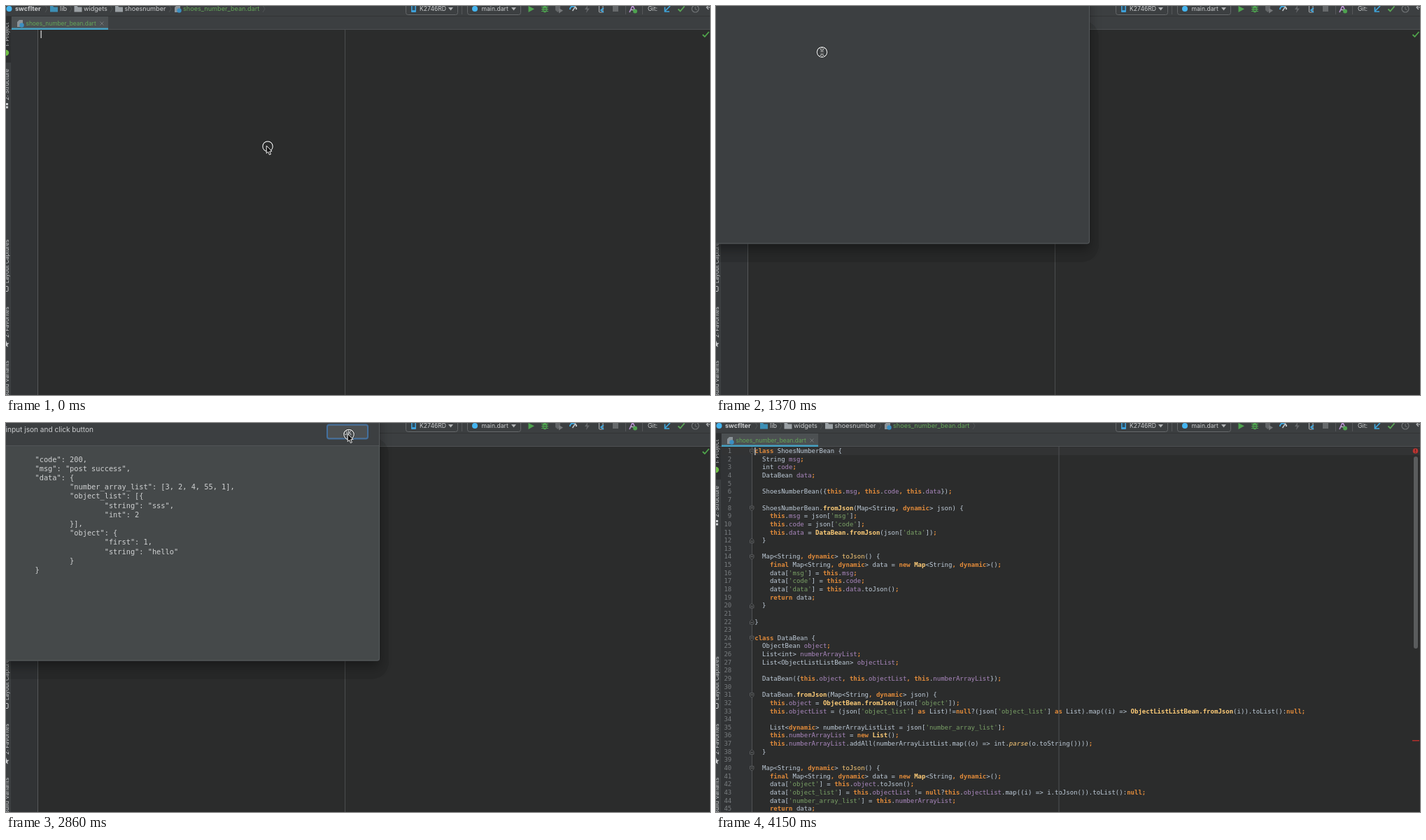
Write an HTML page with a canvas that moves like this. It is 1006 by 557 pixels and loops after 4.38 s.

```html
<!DOCTYPE html>
<html lang="en">
<head>
<meta charset="utf-8">
<title>Generate a class from JSON</title>
<style>
html, body { margin: 0; width: 100%; height: 100%; overflow: hidden; background: #2b2c2c; }
canvas { display: block; }
</style>
</head>
<body>
<canvas id="stage" width="1006" height="557"></canvas>
<script>
const W = 1006, H = 557, LOOP = 4380;
const ctx = document.getElementById('stage').getContext('2d');
const UI = 'Inter, "Open Sans", sans-serif';
const MONO = '"DejaVu Sans Mono", "Liberation Mono", monospace';
const C = {
  panel: '#3c3f41', editor: '#2b2c2c', gutter: '#313335', text: '#cbcdcf',
  plain: '#bfccd9', key: '#e08a3a', str: '#7aa166', field: '#ab88bf',
  func: '#ffcd78', green: '#4ea24f', blue: '#3fa9e0', grey: '#626567'
};

// time, x, y of the pointer's ring
const PATH = [
  [0, 374, 201], [630, 370, 204], [780, 186, 97], [930, 151, 61],
  [1070, 151, 64], [1220, 151.5, 66], [1520, 170, 76], [1670, 264, 158],
  [1970, 295, 141], [2120, 458, 70], [2270, 483, 44.5], [2420, 491, 21],
  [2560, 490, 16.5], [3150, 595, 172], [3420, 933, 512], [3570, 936, 513],
  [3830, 984, 551], [3980, 987, 564], [4150, 987, 600]
];

const CODE = `class ShoesNumberBean {
  String msg;
  int code;
  DataBean data;

  ShoesNumberBean({this.msg, this.code, this.data});

  ShoesNumberBean.fromJson(Map<String, dynamic> json) {
    this.msg = json['msg'];
    this.code = json['code'];
    this.data = DataBean.fromJson(json['data']);
  }

  Map<String, dynamic> toJson() {
    final Map<String, dynamic> data = new Map<String, dynamic>();
    data['msg'] = this.msg;
    data['code'] = this.code;
    data['data'] = this.data.toJson();
    return data;
  }

}

class DataBean {
  ObjectBean object;
  List<int> numberArrayList;
  List<ObjectListListBean> objectList;

  DataBean({this.object, this.objectList, this.numberArrayList});

  DataBean.fromJson(Map<String, dynamic> json) {
    this.object = ObjectBean.fromJson(json['object']);
    this.objectList = (json['object_list'] as List)!=null?(json['object_list'] as List).map((i) => ObjectListListBean.fromJson(i)).toList():null;

    List<dynamic> numberArrayListList = json['number_array_list'];
    this.numberArrayList = new List();
    this.numberArrayList.addAll(numberArrayListList.map((o) => int.parse(o.toString())));
  }

  Map<String, dynamic> toJson() {
    final Map<String, dynamic> data = new Map<String, dynamic>();
    data['object'] = this.object.toJson();
    data['object_list'] = this.objectList != null?this.objectList.map((i) => i.toJson()).toList():null;
    data['number_array_list'] = this.numberArrayList;
    return data;`.split('\n');

const JSON_TEXT = `"code": 200,
"msg": "post success",
"data": {
        "number_array_list": [3, 2, 4, 55, 1],
        "object_list": [{
                "string": "sss",
                "int": 2
        }],
        "object": {
                "first": 1,
                "string": "hello"
        }
}`.split('\n');

function rect(x, y, w, h, color) {
  ctx.fillStyle = color;
  ctx.fillRect(x, y, w, h);
}
function round(x, y, w, h, r, fill, stroke, lw = 1) {
  ctx.beginPath();
  ctx.roundRect(x, y, w, h, r);
  if (fill) { ctx.fillStyle = fill; ctx.fill(); }
  if (stroke) { ctx.strokeStyle = stroke; ctx.lineWidth = lw; ctx.stroke(); }
}
function poly(pts, fill, stroke, lw = 1, open) {
  ctx.beginPath();
  for (let i = 0; i < pts.length; i += 2) ctx.lineTo(pts[i], pts[i + 1]);
  if (!open) ctx.closePath();
  if (fill) { ctx.fillStyle = fill; ctx.fill(); }
  if (stroke) { ctx.strokeStyle = stroke; ctx.lineWidth = lw; ctx.stroke(); }
}
const line = (pts, color, lw = 1) => poly(pts, null, color, lw, true);
function disc(x, y, r, fill, stroke, lw = 1, a = 0, b = 7) {
  ctx.beginPath();
  ctx.arc(x, y, r, a, Math.min(b, a + Math.PI * 2));
  if (fill) { ctx.fillStyle = fill; ctx.fill(); }
  if (stroke) { ctx.strokeStyle = stroke; ctx.lineWidth = lw; ctx.stroke(); }
}
function label(s, x, y, size, color = C.text, style = '', align = 'left') {
  ctx.font = `${style} ${size}px ${UI}`;
  ctx.textAlign = align;
  ctx.fillStyle = color;
  ctx.fillText(s, x, y);
}
function sideLabel(s, bottom) {
  ctx.save();
  ctx.translate(3.6, bottom);
  ctx.rotate(-Math.PI / 2);
  label(s, 0, 0, 8.1);
  ctx.restore();
}

function folder(x, color) {
  poly([x, 0, x + 4, 0, x + 5.5, 1.5, x + 11, 1.5, x + 11, 8.5, x, 8.5], color);
}
function dartFile(x, y) {
  poly([x + 3, y, x + 8, y, x + 8, y + 10, x, y + 10, x, y + 3], '#8b9399');
  disc(x + 6.5, y + 7.5, 3.2, '#3b8fc2');
}
function check(x, y, color) {
  line([x, y + 4, x + 3, y + 7, x + 9, y], color, 1.8);
}
function combo(x, w) {
  round(x + .5, -5.5, w, 18, 3, null, '#646769');
  poly([x + w - 13, 2, x + w - 6, 2, x + w - 9.5, 6.5], '#aeb0b2');
}

function toolbar() {
  rect(0, 0, W, 34, C.panel);
  rect(0, 14, W, 1, '#323435');

  disc(4.5, 4, 4, '#45b5f0');
  label('swcflter', 13, 7.3, 9.15, C.text, 'bold');
  folder(63, '#3d8fb5');
  label('lib', 77, 7.3, 9.15);
  folder(97.5, '#9aa0a4');
  label('widgets', 111, 7.3, 9.15);
  folder(156, '#9aa0a4');
  label('shoesnumber', 169.5, 7.3, 9.15);
  dartFile(241, -1);
  label('shoes_number_bean.dart', 253, 7.3, 9.15, '#64a658');
  for (const x of [56, 91, 149, 233, 367]) line([x, -1, x + 3, 4, x, 9], '#55585a', .8);

  combo(571, 74);
  round(579, -3, 7, 12, 1, '#3fa0d8');
  rect(580.5, 0, 4, 6, '#2d4d60');
  label('K2746RD', 591, 7.2, 8.6);
  rect(651, 0, 1, 12, '#555759');
  combo(659, 76);
  disc(670, 4, 4, '#45b5f0');
  label('main.dart', 679.5, 7.2, 8.6);

  poly([746.5, 0, 755, 4.3, 746.5, 9], C.green);
  for (const y of [1.5, 4.5, 7.5]) line([765, y, 775, y], C.green, 1);
  ctx.beginPath();
  ctx.ellipse(770, 4.5, 3.4, 5, 0, 0, 7);
  ctx.fillStyle = C.green;
  ctx.fill();
  line([768, 4, 772, 4], C.panel, 1);
  line([768, 6.5, 772, 6.5], C.panel, 1);
  poly([785, -1, 792, -1, 792, 5, 788.5, 9, 785, 6], C.grey);
  poly([790, 3, 796, 6.5, 790, 10.5], '#747779');
  disc(810.5, 5, 4.6, null, C.blue, 2, Math.PI, Math.PI * 1.65);
  disc(810.5, 5, 4.6, null, '#c0c4c6', 2, Math.PI * 1.65, Math.PI * 2);
  line([809.5, 7, 813, 2], '#c0c4c6', 1.5);
  poly([831, -1, 827, 5, 830, 5, 829, 10, 834, 3.5, 831, 3.5], C.grey);
  round(847.5, -2, 5.5, 11, 1, null, '#aeb2b5', 1);
  line([854, 3, 850, 6, 854, 9], C.blue, 1.6);
  rect(867, 0, 8, 8, '#66696b');
  rect(885, 0, 1, 12, '#555759');
  line([891, 9, 895.5, -1, 900, 9], '#b78fd0', 1.7);
  line([893, 5.5, 899, 5.5], '#c6c9cb', 1.2);
  disc(899, 7.5, 3, C.green);
  rect(909, 0, 1, 12, '#555759');
  label('Git:', 917, 7.2, 8.8);
  line([949, 0, 942, 7], C.blue, 1.6);
  line([941.5, 1.5, 941.5, 8, 948, 8], C.blue, 1.6);
  check(960.5, .5, '#5aa655');
  disc(985, 4, 5, null, '#717476', 1.2);
  line([985, 1, 985, 4.5, 987.5, 5.5], '#717476', 1);
  line([1004, -1, 1001, 2, 1004, 5], '#b0b3b5', 1.2);
  line([1001, 2, 1006, 2], '#b0b3b5', 1.2);
}

function tab(focused) {
  rect(8, 15, 138, 17, '#4c5052');
  dartFile(16, 20);
  label('shoes_number_bean.dart', 28.5, 28.2, 8.37, '#64a658');
  line([134.5, 22.5, 139.5, 27.5], '#777b7d', .9);
  line([139.5, 22.5, 134.5, 27.5], '#777b7d', .9);
  rect(0, 33, W, 1, '#4d5052');
  rect(8, 31.5, 138, 2.5, focused ? '#46a2c4' : '#4a8097');
}

function sidebar() {
  rect(0, 15, 8, H, C.panel);
  rect(0, 15, 7, 66, '#2d2f30');
  rect(7, 15, 1, H, '#313335');
  sideLabel('1: Project', 58.5);
  disc(0, 67, 4.2, '#6fbf45');
  sideLabel('2: Structure', 135);
  rect(0, 139, 3, 3, C.text);
  rect(0, 143.5, 3, 3, C.text);
  sideLabel('Layout Captures', 397);
  round(-2.5, 401.5, 5.5, 7, 1, null, C.text);
  sideLabel('2: Favorites', 475);
  poly([0, 479, 1.3, 482.5, 4.5, 482.8, 2, 485, 3, 488.5, 0, 486.5], C.text);
  sideLabel('Build Variants', 560);
}

function emptyEditor(caret) {
  rect(8, 34, W, H, C.editor);
  rect(8, 34, 37, H, C.gutter);
  rect(45, 34, 1, H, '#55585a');
  rect(484, 34, 1, H, '#4b4d4e');
  check(995.5, 37, '#4fa54b');
  if (caret) rect(49.5, 35, 1.3, 11, '#d0d2d2');
}

const KEYWORDS = /^(class|this|new|final|return|null)$/;

// Splits a line into [text, colour, font style]; "deep" adds resolved names.
function tokens(src, deep) {
  const decl = /^  [\w<>]+ (\w+);$/.exec(src);
  const member = /^  \S/.test(src);
  const list = src.match(/'[^']*'|[;,]|\w+|[^\w';,]+/g) || [];
  return list.map((t, i) => {
    const before = list[i - 1] || '', prev = list[i - 2] || '', after = list[i + 1] || '';
    if (t[0] === "'") return [t, C.str, ''];
    if (t === ';' || t === ',') return [t, C.key, 'bold'];
    if (KEYWORDS.test(t)) return [t, C.key, 'bold'];
    if (deep) {
      if (t === 'dynamic' || t === 'as') return [t, C.key, 'bold'];
      if (before === '.' && prev === 'this') return [t, C.field, ''];
      if (decl && t === decl[1] && after === ';') return [t, C.field, ''];
      if (t === 'parse') return [t, C.func, 'italic'];
      if (member && t === 'toJson') return [t, C.func, ''];
      const ctor = t === 'fromJson' || prev === 'new';
      const owner = !member && list[i + 2] === 'fromJson';
      const dot = !member && t === '.' && after === 'fromJson';
      if (ctor || owner || dot) return [t, C.func, 'bold'];
    }
    return [t, C.plain, ''];
  });
}
const LEXED = CODE.map(s => tokens(s, false));
const RESOLVED = CODE.map(s => tokens(s, true));

function foldMark(y, up) {
  const d = up ? -1 : 1;
  poly([48.5, y - 3 * d, 54, y - 3 * d, 54, y + d, 51.2, y + 3.5 * d, 48.5, y + d], C.editor, '#66696b', .8);
  line([49.8, y - .5 * d, 52.7, y - .5 * d], '#85888a', .8);
}

function codeEditor(deep) {
  rect(8, 34, W, H, C.editor);
  rect(8, 34, 43, H, C.gutter);
  rect(8, 34.5, W, 11.5, '#323334');
  rect(51, 34, 1, H, '#505355');
  const size = 9.03, rowH = 11.636;
  ctx.font = `${size}px ${MONO}`;
  const cw = ctx.measureText('m'.repeat(100)).width / 100;
  (deep ? RESOLVED : LEXED).forEach((row, n) => {
    const mid = 40.2 + n * rowH, base = mid + 3;
    ctx.font = `${size}px ${MONO}`;
    ctx.textAlign = 'right';
    ctx.fillStyle = '#777b7e';
    ctx.fillText(n + 1, 22.3, base);
    ctx.textAlign = 'left';
    let col = 0;
    for (const [t, color, style] of row) {
      ctx.font = `${style} ${size}px ${MONO}`;
      ctx.fillStyle = color;
      ctx.fillText(t, 55.2 + col * cw, base);
      col += t.length;
    }
    if (deep && /^(class|  \S.*\{$)/.test(CODE[n])) foldMark(mid + .5);
    if (deep && /^ {0,2}\}$/.test(CODE[n])) foldMark(mid + .5, true);
  });
  rect(489.5, 34, 1, H, '#4f5152');
  rect(55.3, 35, 1.2, 11, '#d0d2d2');
  round(997, 48, 6, 275, 3, '#5a5c5d');
  if (deep) {
    disc(999.5, 40, 3.8, '#b93431');
    rect(999, 37.5, 1, 3, '#4a1d1d');
    rect(999, 41.5, 1, 1, '#4a1d1d');
    rect(995, 454, 10, 1.5, '#b3302c');
  } else {
    ctx.beginPath();
    ctx.ellipse(999.5, 40, 4.5, 2.8, 0, 0, 7);
    ctx.strokeStyle = '#9a9d9f';
    ctx.lineWidth = 1;
    ctx.stroke();
    disc(999.5, 40, 1.6, '#9a9d9f');
  }
}

function withShadow(blur, dy, alpha, draw) {
  ctx.save();
  ctx.shadowColor = `rgba(0,0,0,${alpha})`;
  ctx.shadowBlur = blur;
  ctx.shadowOffsetY = dy;
  draw();
  ctx.restore();
}

function popup() {
  withShadow(12, 4, .4, () => rect(50, 46, 141, 52, C.panel));
  rect(50, 46, 141, 18.5, '#4a4d4f');
  label('Generate', 121.8, 58.5, 9.9, C.text, '', 'center');
  rect(50, 65, 141, 15.5, '#2a62cb');
  label('JsonToDartClass', 70.5, 76, 10, '#f2f4f6');
  label('^N', 168, 76, 10, '#b5c8ee');
  label('Copyright', 70.5, 93.5, 10);
}

function dialog(filled, focus, pasted) {
  round(-40, 20, 587, 347, 25, 'rgba(0,0,0,.1)');
  withShadow(16, 8, .35, () => round(-20, -20, 554, 360.5, 3, C.panel));
  if (filled) {
    round(-20, 32, 554, 308.5, [0, 0, 3, 3], '#45494a');
    rect(0, 32, 534, 1, '#515557');
    label('input json and click button', -.5, 12.6, 10.1);
    round(459.5, 3.5, 57, 18, 2, '#4c5052', '#616567');
    if (focus) round(459, 2.5, 58, 20, 3, null, '#43709e', 2);
    label('ok', 488, 16.7, 10.1, C.text, '', 'center');
  }
  round(-20, -20, 553.5, 360, 3, null, '#565a5c');
  if (pasted) {
    ctx.font = `10.3px ${MONO}`;
    ctx.textAlign = 'left';
    ctx.fillStyle = '#cfd1d2';
    JSON_TEXT.forEach((s, n) => ctx.fillText(s, 41.5, 55.8 + n * 13.17));
  }
}

function pointer(t) {
  const [, x, y] = PATH.filter(p => p[0] <= t).pop();
  disc(x, y, 7.2, null, 'rgba(0,0,0,.45)', 2.6);
  disc(x, y, 7.2, null, '#eceeee', 1.2);
  if (t >= 1370 && t < 2420) {
    const beam = [[-2.5, -6, 0, -4.5, 2.5, -6], [0, -4.5, 0, 5], [-2.5, 6.5, 0, 5, 2.5, 6.5], [-1.5, 1, 1.5, 1]];
    for (const [color, lw] of [['#e6e8e8', 3], ['#1c1c1c', 1.2]])
      for (const s of beam) line(s.map((v, i) => v + (i % 2 ? y : x)), color, lw);
  } else {
    const arrow = [-1.8, -1, -1.8, 10, .7, 7.8, 2.4, 12, 4.4, 11.2, 2.7, 7.2, 6, 7];
    poly(arrow.map((v, i) => v + (i % 2 ? y : x)), '#0a0a0a', '#f2f2f2', 1);
  }
}

function draw(t) {
  const done = t >= 3000;
  ctx.clearRect(0, 0, W, H);
  if (done) codeEditor(t >= 3830); else emptyEditor(t < 450);
  toolbar();
  sidebar();
  tab(t < 450 || done);
  if (t >= 450 && t < 1370) popup();
  if (t >= 1370 && !done) dialog(t >= 1520, t < 1820 || t >= 2860, t >= 2420);
  pointer(t);
}

function frame() {
  draw(performance.now() % LOOP);
  requestAnimationFrame(frame);
}
frame();
</script>
</body>
</html>
```
